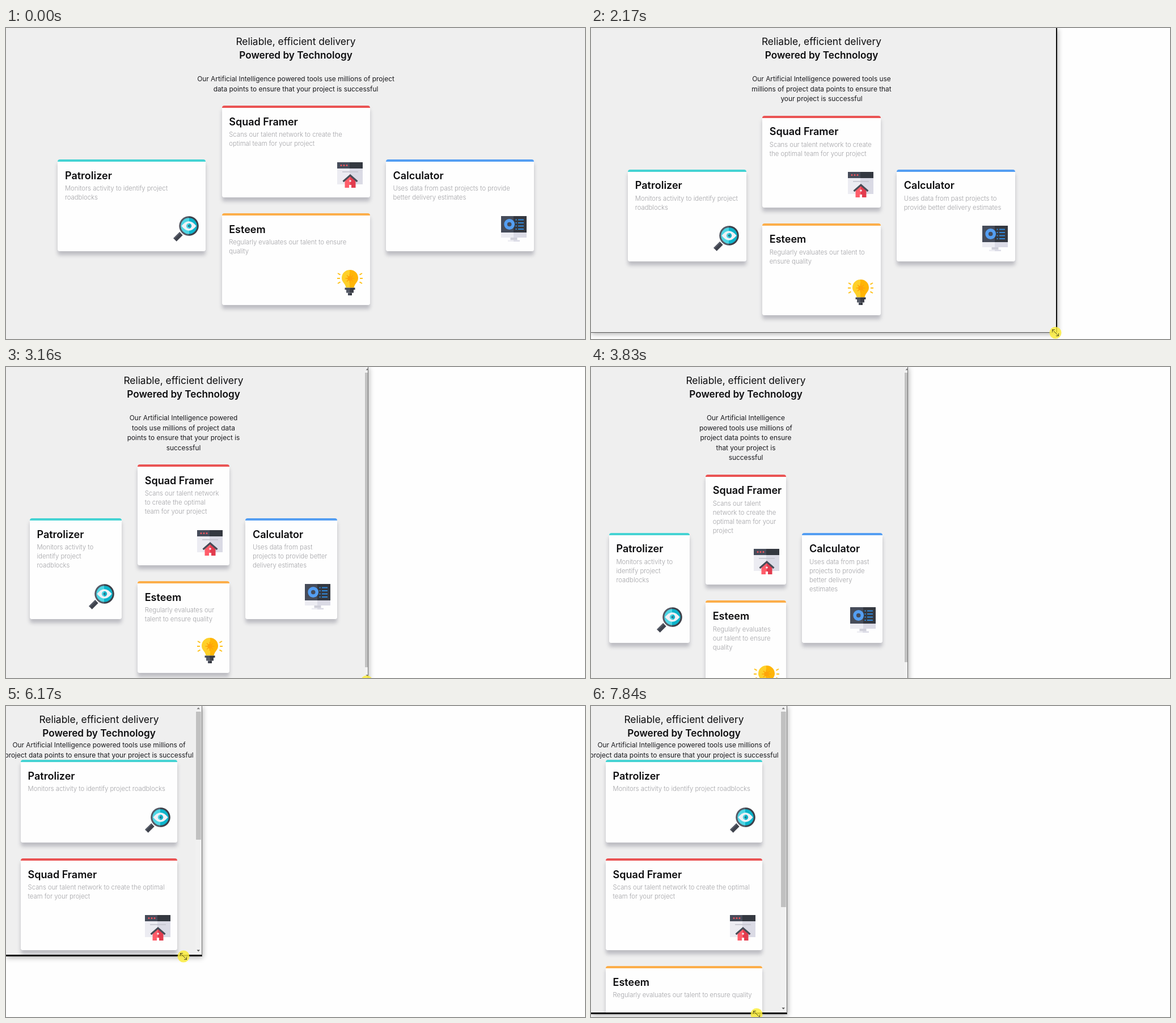
An HTML page for the animation above (8000 ms loop, 1021 px wide and 549 px high).

```html
<!DOCTYPE html>
<html lang="en">
<head>
<meta charset="utf-8">
<title>Responsive cards</title>
<style>
  html, body { margin: 0; width: 100%; height: 100%; overflow: hidden; background: #fefefe; }
  body { position: relative; font-family: Inter, "Open Sans", sans-serif; color: #0c0c0e; }
  div, svg { position: absolute; white-space: nowrap; }
  .win { left: 0; top: 0; box-sizing: border-box; overflow: hidden; background: #efefef;
         border: 0 solid #0a0a0a; box-shadow: 1px 2px 9px rgba(0,0,0,.32); }
  .mid { left: -500px; text-align: center; }
  .head { top: 11.6px; font-size: 17.4px; line-height: 24.5px; }
  .head b { font-size: 17.2px; font-weight: 600; }
  .intro { font-size: 11.9px; line-height: 17.5px; color: #1a1a1e; }
  .card { box-sizing: border-box; background: #fefefe; border-radius: 4px; overflow: hidden; }
  .shade { border-radius: 4px; box-shadow: 0 7px 6px rgba(115,115,130,.4); }
  .bar { left: 0; top: 0; width: 100%; height: 4px; }
  .name { left: 12.7px; top: 16.6px; font-size: 18px; line-height: 24px; font-weight: 600; }
  .text { left: 12.7px; top: 43.2px; font-size: 11.3px; line-height: 16px; font-weight: 300; color: #a2a2a6; }
  .icon { right: 12.5px; bottom: 17.3px; width: 45px; height: 45px; }
  .track { top: 0; width: 10.5px; height: 100%; background: #f1f1f1; }
  .thumb { left: 1px; top: 9.5px; width: 8.5px; background: #c1c1c1; }
</style>
</head>
<body>
<svg width="0" height="0"><defs id="defs"></defs></svg>
<div id="stage"></div>
<script>
// Two-tone fills: left half, right half
const tones = {
  dark: ['#464c5a', '#343840'], pale: ['#ececf2', '#dadae5'], red: ['#ff5d6a', '#e23c4e'],
  cyan: ['#4dd5e4', '#0cb4cb'], gold: ['#fed02a', '#ffb506'], ring: ['#555a66', '#3d4049']
};
document.getElementById('defs').innerHTML = Object.entries(tones).map(([id, [a, b]]) =>
  `<linearGradient id="${id}"><stop offset=".5" stop-color="${a}"/><stop offset=".5" stop-color="${b}"/></linearGradient>`
).join('');

const rect = (x, y, w, h, fill) => `<rect x="${x}" y="${y}" width="${w}" height="${h}" fill="${fill}"/>`;
const disc = (x, y, r, fill) => `<circle cx="${x}" cy="${y}" r="${r}" fill="${fill}"/>`;
const path = (d, fill) => `<path d="${d}" fill="${fill}"/>`;
const line = (d, color, w) => `<path d="${d}" fill="none" stroke="${color}" stroke-width="${w}"/>`;
const repeat = (n, draw) => Array.from({ length: n }, (_, i) => draw(i)).join('');

const rays = line('M0 15H5M1 6 5.5 8.7M1 24 5.5 21.3', '#ffc11a', 2);
const icons = {
  lens: line('M14 31 3 42', '#3f434d', 7.5) + line('M12 29 1 40', '#555a66', 2.5) +
    disc(27.5, 17.5, 17.3, 'url(#ring)') + disc(27.5, 17.5, 14.3, 'url(#cyan)') +
    path('M14.5 17.5Q27.5 1 40.5 17.5 27.5 34 14.5 17.5Z', '#f0f1f6') +
    disc(27.5, 17.5, 4.7, 'url(#cyan)') + disc(27.5, 17.5, 1.9, '#2f6f88'),
  house: rect(0, 10, 45, 29, 'url(#pale)') + rect(0, 0, 45, 11, 'url(#dark)') +
    repeat(3, i => disc(7 + 5 * i, 5.5, 1.5, '#f05560')) + rect(9, 16, 28, 1.7, '#c6c6d0') +
    path('M13.5 45V33L23 24.5 32.5 33V45H25V40H21V45Z', 'url(#red)') +
    line('M10.5 34 23 23 35.5 34', '#484c57', 3) + disc(23, 33, 1.8, '#f3eef2'),
  bulb: path('M22.5 0C31 0 37 6.3 37 14.3 37 22 30.5 24 29.5 31.5H15.5C14.5 24 8 22 8 14.3 8 6.3 14 0 22.5 0Z', 'url(#gold)') +
    line('M22.5 7V23M14.5 15H30.5M17 9.5 28 20.5M28 9.5 17 20.5', '#ffa40a', 1.6) + disc(22.5, 15, 4.3, '#ffa40a') +
    rays + `<g transform="matrix(-1 0 0 1 45 0)">${rays}</g>` +
    rect(13.5, 31.5, 18, 3.5, 'url(#dark)') + rect(16, 35, 13, 5.5, 'url(#ring)') + rect(19, 40.5, 7, 4.5, 'url(#dark)'),
  screen: rect(0, 0, 45, 29, 'url(#dark)') + rect(0, 29, 45, 9, 'url(#pale)') +
    rect(16.5, 38, 12, 4.5, '#d0d0da') + rect(12, 42.5, 21, 2.5, 'url(#pale)') +
    '<circle cx="14.7" cy="14.5" r="6.6" fill="none" stroke="#549ef2" stroke-width="5.6"/>' +
    repeat(4, i => rect(25.5, 5.5 + 5.5 * i, 2.2, 2, '#3187d8') + rect(30, 5.5 + 5.5 * i, 10, 2, '#3187d8'))
};

const cards = [
  ['Patrolizer', '#45d3d3', 'lens', 'Monitors activity to identify project roadblocks'],
  ['Squad Framer', '#ea5454', 'house', 'Scans our talent network to create the optimal team for your project'],
  ['Esteem', '#fcae4a', 'bulb', 'Regularly evaluates our talent to ensure quality'],
  ['Calculator', '#549ef2', 'screen', 'Uses data from past projects to provide better delivery estimates']
];
const intro = 'Our Artificial Intelligence powered tools use millions of project data points ' +
  'to ensure that your project is successful';

// Approximate text width in em, used to choose line breaks
const glyph = c => /[ ijl]/.test(c) ? .24 : /[tfr]/.test(c) ? .35 : /[mw]/.test(c) ? .88 : .6;
const measure = s => [...s].reduce((sum, c) => sum + glyph(c), 0);
function wrap(text, max) {
  const lines = [];
  for (const word of text.split(' ')) {
    const last = lines.length - 1, longer = lines[last] + ' ' + word;
    if (last >= 0 && measure(longer) <= max) lines[last] = longer;
    else lines.push(word);
  }
  return lines;
}

function card([name, color, icon], rows, x, y, w, h) {
  const place = `left:${x}px;top:${y}px;width:${w}px;height:${h}px`;
  return `<div class="shade" style="${place}"></div><div class="card" style="${place}">
    <div class="bar" style="background:${color}"></div><div class="name">${name}</div>
    <div class="text">${rows.join('<br>')}</div>
    <svg class="icon" viewBox="0 0 45 45">${icons[icon]}</svg></div>`;
}

// Page content for a given client width, and the height it needs
function layout(client) {
  const wide = client > 520, mid = client / 2, gap = 28;
  const col = wide ? .25 * client + 5.5 : .9 * client - 19;
  const lines = wrap(intro, wide ? .0328 * client - 3.5 : .086 * client + .7);
  const rows = cards.map(c => wrap(c[3], (col - 26) / 11.05));
  const heights = rows.map(r => 130 + 16 * r.length);
  const put = (i, x, y, h = heights[i]) => card(cards[i], rows[i], x, y, col, h);
  const x = mid - col / 2, span = `width:${client + 1000}px`;
  const introTop = wide ? 81.2 : 60.2;
  let y = (wide ? 102 : 60) + 17.5 * lines.length;
  let html = `<div class="mid head" style="${span}">Reliable, efficient delivery<br><b>Powered by Technology</b></div>
    <div class="mid intro" style="${span};top:${introTop}px">${lines.join('<br>')}</div>`;
  if (wide) {
    const side = Math.max(heights[0], heights[3]), left = .125 * client - 36.5;
    const sideTop = y + (heights[1] + gap + heights[2] - side) / 2;
    html += put(0, left, sideTop, side) + put(3, client - left - col, sideTop, side);
  }
  for (const i of wide ? [1, 2] : [0, 1, 2, 3]) {
    html += put(i, x, y);
    y += heights[i] + gap;
  }
  return { html, page: y + 2 };
}

function scrollbar(x, height, page) {
  const end = Math.min(1, height / page) * (height - 20);
  const y = height - 10;
  return `<div class="track" style="left:${x}px"><div class="thumb" style="height:${end}px"></div>
    <svg width="11" height="${height}">${path('M2.5 5.5 5.2 2.5 8 5.5Z', '#777') +
      path(`M2.5 ${y - 1.5}H8L5.2 ${y + 1.5}Z`, '#555')}</svg></div>`;
}

function pointer(x, y) {
  return `<svg style="left:${x - 11}px;top:${y - 11}px" width="22" height="22" viewBox="-11 -11 22 22">
    ${disc(0, 0, 10.5, 'rgba(250,236,60,.85)')}
    ${line('M-5.5-1V-5.5H-1M-5.5-5.5 5.5 5.5M1 5.5H5.5V1', '#5c5620', 1)}</svg>`;
}

// Dragged corner of the window: [step, position], straight moves in between
const dragX = [[-1, 1035], [0, 1029], [2, 1007], [5, 821.5], [7, 686], [8, 639], [12, 479], [13, 421.5], [14, 369], [15, 341]];
const dragY = [[-1, 590], [3, 560], [5, 538], [8, 555], [12, 591], [15, 585], [17, 442], [19, 378], [20, 452], [22, 544]];
function along(points, k) {
  const i = points.findIndex(p => p[0] >= k);
  if (i < 1) return points.at(i)[1];
  const [k0, a] = points[i - 1], [k1, b] = points[i];
  return a + (b - a) * (k - k0) / (k1 - k0);
}

function scene(k) {
  const x = along(dragX, k), height = along(dragY, k);
  const width = Math.max(x, 346);
  const wide = width > 520;
  const scrolls = height > 545 || !wide;
  const edge = x - (scrolls ? 7 : 2.5);
  const { html, page } = layout(edge - 6);
  const right = width > 800 ? '2.5px' : '1px;border-right-color:#707070';
  const bottom = wide ? '1px;border-bottom-color:#555' : '3px';
  const slide = 17.4 * Math.sqrt(Math.max(0, k - 15));
  return `<div class="win" style="width:${width}px;height:${height}px;border-right-width:${right};border-bottom-width:${bottom}">
    ${html}${scrolls ? scrollbar(edge, height, page) : ''}</div>${pointer(x - 3 - slide, height)}`;
}

// The screen refreshes about three times a second
const stage = document.getElementById('stage');
let shown;
function tick() {
  const t = performance.now() % 8000;
  const k = Math.max(-1, Math.floor((t - 492) / 333.4));
  if (k !== shown) {
    stage.innerHTML = scene(k);
    shown = k;
  }
  requestAnimationFrame(tick);
}
tick();
</script>
</body>
</html>
```
